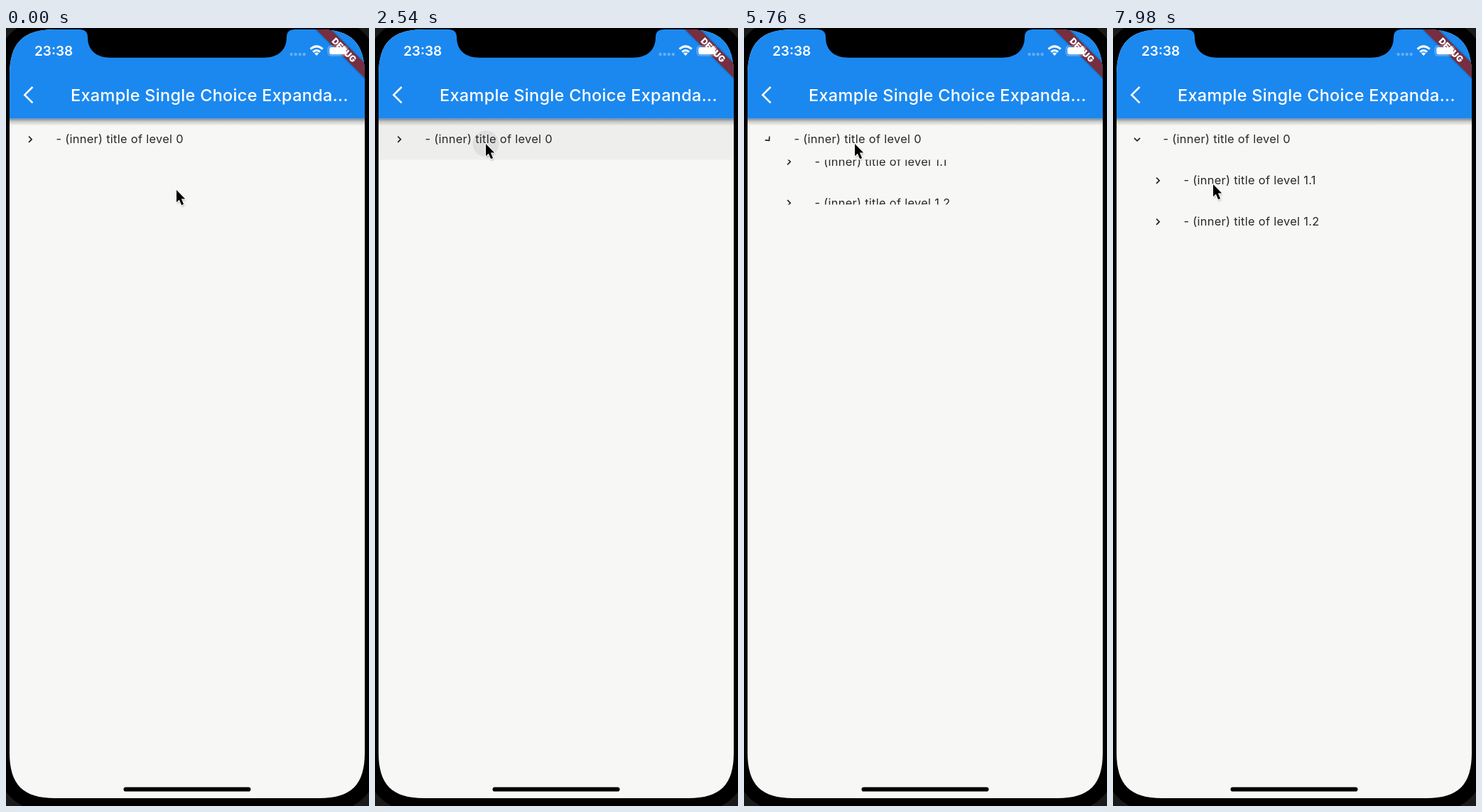
An HTML page that plays this animation: 511x1095 px, repeating every 8 s.

```html
<!DOCTYPE html>
<html lang="en">
<head>
<meta charset="utf-8">
<title>Expandable list</title>
<style>
  html, body { margin: 0; width: 100%; height: 100%; overflow: hidden; background: #1a1a1a; }
  svg { display: block; width: 511px; height: 1095px; }
  text { font-family: Inter, Roboto, sans-serif; font-optical-sizing: none; }
  .row text { font-size: 16.4px; letter-spacing: .3px; fill: #282828; }
  .heading { font-size: 23.5px; font-weight: 500; letter-spacing: .29px; }
  .line { fill: none; stroke-linejoin: miter; }
</style>
</head>
<body>
<svg viewBox="0 0 511 1095">
  <defs>
    <clipPath id="screen">
      <path d="M5 66C5 21 24 2 69 2H441C486 2 505 21 505 66V1020C505 1065 486 1084 441 1084H69C24 1084 5 1065 5 1020Z"/>
    </clipPath>
    <clipPath id="tile"><rect x="5" y="127.5" width="500" height="58"/></clipPath>
    <clipPath id="panel"><rect id="panelBox" x="5" y="185.5" width="500" height="0"/></clipPath>
    <linearGradient id="fade" x2="0" y2="1">
      <stop offset="0" stop-opacity=".45"/>
      <stop offset=".4" stop-opacity=".18"/>
      <stop offset="1" stop-opacity="0"/>
    </linearGradient>
    <filter id="soft" x="-50%" y="-50%" width="200%" height="200%"><feGaussianBlur stdDeviation="1.6"/></filter>
    <path id="chevron" class="line" d="M-1.9 -4.1L2.2 0L-1.9 4.1" stroke="#222" stroke-width="1.7"/>
    <path id="arrow" d="M0 0V17.2L3.9 13.7L7.1 21.2L10.1 19.9L6.9 12.6H12.2Z"/>
  </defs>

  <rect x="-14" y="-14" width="539" height="1118" rx="72"/>

  <g clip-path="url(#screen)">
    <rect width="511" height="1095" fill="#f7f7f6"/>

    <g clip-path="url(#tile)">
      <rect id="highlight" x="5" y="127" width="500" height="59" fill="#bcbcbc"/>
      <circle id="splash" cx="156" cy="163" fill="#c8c8c8"/>
    </g>

    <g class="row">
      <g transform="translate(34 156.7)"><use id="toggle" href="#chevron"/></g>
      <circle id="spinner" class="line" r="7.3" pathLength="360" stroke="#2c94e4" stroke-width="1.25"/>
      <text id="title" y="162.4">- (inner) title of level 0</text>
    </g>

    <g clip-path="url(#panel)">
      <g id="children" class="row">
        <use href="#chevron" x="63" y="214.7"/>
        <text x="99.4" y="220.4">- (inner) title of level 1.1</text>
        <use href="#chevron" x="63" y="272.7"/>
        <text x="99.4" y="278.4">- (inner) title of level 1.2</text>
      </g>
    </g>

    <rect y="127.6" width="511" height="10" fill="url(#fade)"/>
    <rect width="511" height="127.6" fill="#1b88ef"/>
    <path class="line" d="M37.5 83L26.3 94.2L37.5 105.4" stroke="#fff" stroke-width="2.6"/>
    <text class="heading" x="91" y="102.6" fill="#fff">Example Single Choice Expanda...</text>

    <g transform="translate(505 2) rotate(45)">
      <rect x="-60" y="33.8" width="120" height="14.5" opacity=".4" filter="url(#soft)"/>
      <rect x="-60" y="33.8" width="120" height="14.5" fill="#762e40"/>
      <text y="45.5" font-size="12.3" font-weight="900" fill="#fff" text-anchor="middle">DEBUG</text>
    </g>

    <text x="40" y="39" font-size="19" font-weight="600" fill="#fff">23:38</text>
    <g fill="#fff" opacity=".32">
      <circle cx="401.7" cy="37" r="2.2"/><circle cx="407.7" cy="37" r="2.2"/>
      <circle cx="413.7" cy="37" r="2.2"/><circle cx="419.7" cy="37" r="2.2"/>
    </g>
    <g class="line" stroke="#fff" stroke-width="3">
      <path d="M428.6 29.7Q437.2 22 445.8 29.7"/>
      <path d="M432.2 33.7Q437.2 29.3 442.2 33.7"/>
    </g>
    <path d="M434 35.6Q437.2 33.2 440.4 35.6L437.2 39Z" fill="#fff"/>
    <rect x="453.4" y="25.3" width="27.4" height="13.6" rx="4" class="line" stroke="#fff" stroke-opacity=".4" stroke-width="1.2"/>
    <rect x="455.2" y="27" width="23.8" height="10.2" rx="2.4" fill="#fff"/>
    <path d="M482 29.8Q484.2 32 482 34.4Z" fill="#fff" opacity=".45"/>

    <path d="M103 0V2Q115 2 115 13C115 32 128 41.7 147 41.7H363C382 41.7 395 32 395 13Q395 2 407 2V0Z"/>
    <rect x="165.5" y="1068.4" width="179" height="6.2" rx="3.1"/>
  </g>

  <g id="cursor">
    <use href="#arrow" x=".8" y="2" opacity=".4" filter="url(#soft)"/>
    <use href="#arrow" fill="#fff" stroke="#fff" stroke-width="2.2" stroke-linejoin="round"/>
    <use href="#arrow"/>
  </g>
</svg>

<script>
const LOOP = 8000;
const PRESS = 860, RELEASE = 940, EXPAND = 1945;   // in recorded milliseconds
const TILES = 116;                                 // height of the two inner rows

const get = id => document.getElementById(id);
const set = (id, attrs) => {
  for (const name in attrs) get(id).setAttribute(name, attrs[name]);
};
const clamp = x => Math.min(1, Math.max(0, x));
const mix = (a, b, k) => a + (b - a) * k;

function bezier(x1, y1, x2, y2) {
  const at = (a, b, u) => 3 * a * u * (1 - u) ** 2 + 3 * b * u * u * (1 - u) + u ** 3;
  return x => {
    if (x <= 0 || x >= 1) return clamp(x);
    let low = 0, high = 1;
    for (let i = 0; i < 24; i++) {
      const mid = (low + high) / 2;
      if (at(x1, x2, mid) < x) low = mid; else high = mid;
    }
    return at(y1, y2, low);
  };
}
const easeIn = bezier(.42, 0, 1, 1);
const fastOutSlowIn = bezier(.4, 0, .2, 1);
const glide = bezier(.3, .1, .6, 1);

// Playback shows 60 Hz steps, held for 20, 20 and 100 ms in turn.
function stepAt(ms) {
  const phase = (ms + 20) % 140;
  return 3 * Math.floor((ms + 20) / 140) + (phase < 20 ? 0 : phase < 40 ? 1 : 2);
}

// step, x, y
const cursorPath = [
  [1, 240, 228], [33, 159, 168], [48, 156, 163], [128, 156, 163],
  [148, 156, 166], [153, 156, 166], [172, 141, 220]
];

function drawCursor(step) {
  let i = 1;
  while (i < cursorPath.length - 1 && step > cursorPath[i][0]) i++;
  const [n0, x0, y0] = cursorPath[i - 1], [n1, x1, y1] = cursorPath[i];
  const k = glide(clamp((step - n0) / (n1 - n0)));
  set('cursor', { transform: `translate(${mix(x0, x1, k)} ${mix(y0, y1, k)})` });
}

function drawInk(time) {
  const held = time - PRESS, released = time - RELEASE, hold = RELEASE - PRESS;
  const grown = held < hold ? held / 1000 : hold / 1000 + released / 208;
  const lit = clamp(Math.min(held, hold - released) / 200);
  set('splash', {
    r: 252 * clamp(grown),
    opacity: held < 0 ? 0 : .4 * clamp(1 - released / 200)
  });
  set('highlight', { opacity: .4 * lit });
}

function drawSpinner(time) {
  const busy = time >= RELEASE && time < EXPAND;
  const elapsed = Math.max(0, time - RELEASE);
  const part = elapsed / 1333 % 1;
  const head = fastOutSlowIn(part * 2), tail = fastOutSlowIn(part * 2 - 1);
  const start = -90 + 270 * tail + 360 * elapsed / 2222 + 90 * part;
  set('spinner', {
    visibility: busy ? 'visible' : 'hidden',
    'stroke-dasharray': `${Math.max(270 * (head - tail), .1)} 720`,
    transform: `translate(70 156.7) rotate(${start})`
  });
  set('title', { x: busy ? 84.9 : 70.4 });
}

function drawPanel(time) {
  const open = easeIn((time - EXPAND) / 200);
  set('panelBox', { height: TILES * open });
  set('children', { transform: `translate(0 ${-TILES * (1 - open) / 2})` });
  set('toggle', { transform: `rotate(${90 * open})` });
}

function draw(now) {
  const step = stepAt(now % LOOP), time = step * 1000 / 60;
  drawCursor(step);
  drawInk(time);
  drawSpinner(time);
  drawPanel(time);
  requestAnimationFrame(draw);
}
draw(0);
</script>
</body>
</html>
```
